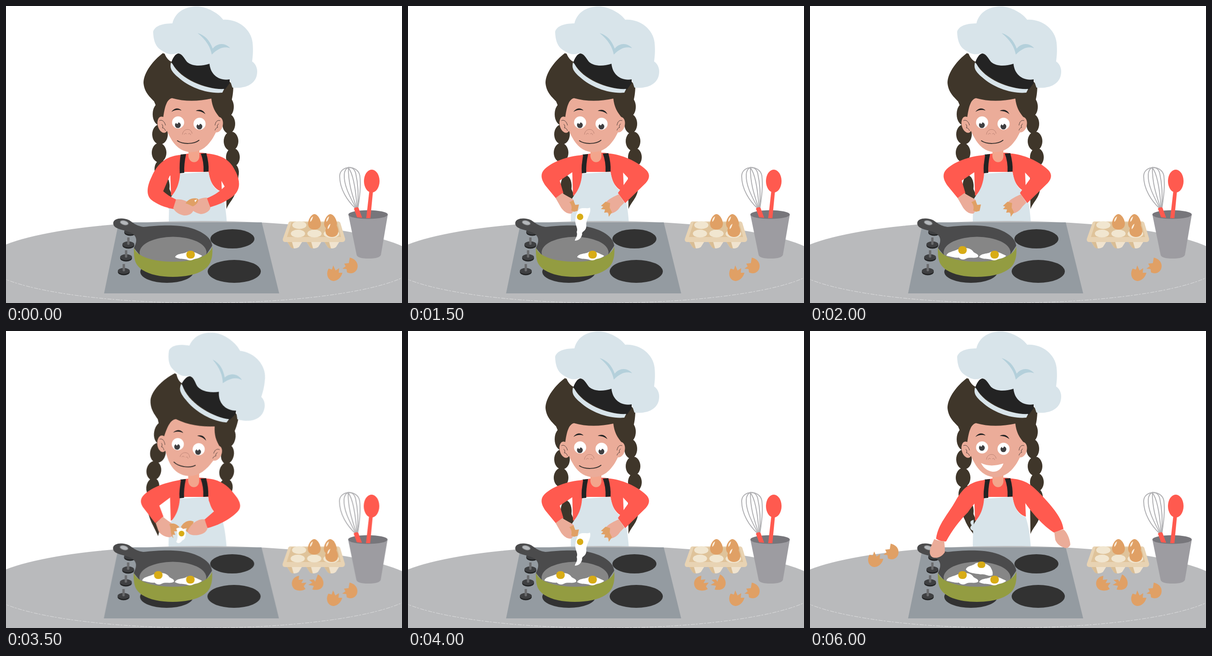
An HTML page that plays this animation: 864x648 px, repeating every 7000 ms.

```html
<!DOCTYPE html>
<html lang="en">
<head>
<meta charset="utf-8">
<title>Cooking eggs</title>
<style>
html, body { margin: 0; width: 100%; height: 100%; overflow: hidden; background: #fff; }
svg { display: block; width: 100%; height: 100%; }

.red { fill: #ff5a4f; }
.skin { fill: #ebac99; }
.hair { fill: #3f362a; }
.cloth { fill: #d8e4ea; }
.black { fill: #232323; }
.shell { fill: #e0a065; }
.white { fill: #fff; }
.yolk { fill: #d8ac16; }
.burner { fill: #323232; }
.line { fill: none; stroke: #4a3a36; stroke-width: 1; stroke-linecap: round; }

/* Every change is a hard cut, so all timelines hold their steps. */
.scene, .tilt, .pupils, .closed, [class^="show"] { animation: 7s step-end infinite; }
[class^="show"] { visibility: hidden; }
.scene { animation-name: nudge; }
.tilt { animation-name: tilt; transform-origin: 411px 256px; }
.pupils { animation-name: look-up; }
.closed { animation-name: close-mouth; }
.show-hold { animation-name: hold; }
.show-crack { animation-name: crack; }
.show-open { animation-name: open; }
.show-drop { animation-name: drop; }
.show-second { animation-name: second; }
.show-shells { animation-name: shells; }
.show-third { animation-name: third; }
.show-rest { animation-name: rest; }
.show-grin { animation-name: grin; }

@keyframes nudge {
  14.285% { transform: translateX(.5px); } 21.428% { transform: none; }
  50% { transform: translateX(-.5px); } 57.142% { transform: none; }
}
@keyframes tilt {
  14.285%, 50% { transform: translate(-1px, -1px) rotate(10deg); }
  21.428%, 57.142% { transform: none; }
}
@keyframes hold { 0%, 35.714% { visibility: visible; } 14.285%, 50% { visibility: hidden; } }
@keyframes crack { 14.285%, 50% { visibility: visible; } 21.428%, 57.142% { visibility: hidden; } }
@keyframes open { 21.428%, 57.142% { visibility: visible; } 35.714%, 71.428% { visibility: hidden; } }
@keyframes drop { 21.428%, 57.142% { visibility: visible; } 28.571%, 64.285% { visibility: hidden; } }
@keyframes second { 28.571% { visibility: visible; } }
@keyframes shells { 35.714% { visibility: visible; } }
@keyframes third { 64.285% { visibility: visible; } }
@keyframes rest { 71.428% { visibility: visible; } }
@keyframes grin { 85.714% { visibility: visible; } }
@keyframes close-mouth { 85.714% { visibility: hidden; } }
@keyframes look-up { 85.714% { transform: translateY(-5px); } }
</style>
</head>
<body>
<svg viewBox="0 0 864 648">
<defs>
  <g id="knob">
    <ellipse cy="1" rx="13" ry="7.5" fill="#242526"/>
    <ellipse cy="-1" rx="13" ry="6.5" fill="#3f4042"/>
    <path d="M-2.5 -16H2.5V-1Q0 1 -2.5 -1Z" fill="#6a6b6d"/>
  </g>
  <g id="egg">
    <path class="shell" d="M0 -17C8 -16 14 -4 14 4C14 12 8 17 0 17S-14 12 -14 4C-14 -4 -8 -16 0 -17Z"/>
    <path d="M-3 -12C-8 -9 -10 -4 -9 0C-6 -2 -4 -7 -3 -12Z" fill="#fbeedd"/>
  </g>
  <g id="shellPair" class="shell">
    <path d="M704 573L711 575L714 566L719 577L727 572L726 582L734 582C731 594 722 600 714 600C700 598 698 582 704 573Z"/>
    <path d="M750 549C764 552 770 563 766 574C761 584 751 585 744 581L743 574L734 573L741 568L738 562L748 561Z"/>
  </g>
  <g id="cartonCup">
    <path d="M-16 -6H16L9 5Q0 11 -9 5Z" fill="#f0e3ce"/>
    <path d="M-16 -6H-6L-2 8Q-7 8 -9 5Z" fill="#d9bd94"/>
  </g>
</defs>

<g class="scene">
  <g class="tilt hair">
    <ellipse cx="335" cy="236" rx="15" ry="24"/>
    <ellipse cx="336" cy="280" rx="17" ry="22"/>
    <ellipse cx="334" cy="320" rx="16" ry="21"/>
    <ellipse cx="338" cy="356" rx="14" ry="20"/>
    <ellipse cx="345" cy="393" rx="12" ry="23"/>
    <path d="M335 403C340 425 354 438 368 459L370 430L356 398Z"/>
    <ellipse cx="483" cy="220" rx="14" ry="22"/>
    <ellipse cx="486" cy="257" rx="14" ry="21"/>
    <ellipse cx="491" cy="295" rx="16" ry="21"/>
    <ellipse cx="495" cy="330" rx="15" ry="20"/>
    <ellipse cx="494" cy="363" rx="14" ry="20"/>
    <path d="M480 360H508C507 380 505 385 502 400C499 420 488 426 481 443Z"/>
    <path d="M342 103C322 118 300 145 300 168C302 190 316 200 323 208L345 260H470L490 215C494 200 496 190 496 172L420 110L376 103L362 122C356 120 350 114 346 104Z"/>
  </g>

  <path class="red" d="M356 333C370 326 385 324 398 322L422 320C440 320 455 326 468 333L471 405C455 400 445 385 442 362H380C380 385 375 408 360 414L358 350Z"/>
  <path d="M398 308H422V328C421 345 400 345 398 328Z" fill="#f3a58c"/>
  <path class="cloth" d="M380 366L442 362C446 388 456 402 470 405C476 420 480 445 482 475H355L356 425C361 410 376 406 380 366Z"/>
  <path class="black" d="M381 324L393 323Q388 345 389 364L379 365Q378 343 381 324ZM425 322L437 321Q443 342 442 361L431 362Q432 340 425 322Z"/>

  <g class="tilt">
    <ellipse class="skin" cx="342" cy="259" rx="11" ry="18" transform="rotate(-14 342 259)"/>
    <ellipse class="skin" cx="462" cy="259" rx="11" ry="17" transform="rotate(14 462 259)"/>
    <path class="skin" d="M343 244C346 222 350 204 362 201C390 209 420 208 448 202C450 220 456 232 468 245C462 275 445 305 425 314C410 321 395 320 382 313C365 303 357 285 350 270Z"/>
    <path class="line" d="M335 250C340 247 346 252 348 260M340 258Q344 262 341 266Q345 265 348 272M467 250C462 248 457 252 456 260M464 257Q459 261 462 265Q458 265 456 271"/>
    <circle class="white" cx="375.5" cy="254" r="13.2"/>
    <circle class="white" cx="422.3" cy="257" r="13.2"/>
    <g class="pupils">
      <circle cx="375" cy="260" r="6.3" fill="#3f3f41"/>
      <circle cx="422" cy="263" r="6.3" fill="#3f3f41"/>
      <path class="white" d="M371 253H376Q376 258 372 257ZM418 256H423Q423 261 419 260Z"/>
    </g>
    <path class="black" d="M361 231C367 222 377 221 383 228C375 226 369 226 361 231ZM414 229C422 224 431 227 435 236C428 230 421 229 414 229Z"/>
    <path class="line" d="M385 280C386 267 404 265 406 278M389 280Q391 276 394 279M398 279Q401 276 403 281" style="stroke: #b98072"/>
    <path class="closed" d="M374 294C385 302 410 302 421 293" fill="none" stroke="#3a3330" stroke-width="2" stroke-linecap="round"/>
    <path class="show-grin" fill="#fff" d="M373 288C390 296 405 294 422 289C418 302 408 308 398 307C386 305 378 298 373 288Z"/>
    <path class="black" d="M361 122C366 108 373 102 378 104C395 115 410 125 443 125L488 158V168L478 182C440 182 382 160 361 122Z"/>
    <path class="cloth" d="M360 123C357 135 360 142 375 155C400 178 440 192 472 189L476 181C440 183 382 162 363 126Z"/>
    <path class="cloth" d="M363 38C370 10 395 0 420 1C445 4 465 18 474 30C505 28 535 50 538 80C540 100 538 112 537 121C547 128 550 140 547 152C542 172 520 181 494 178L488 160C465 164 446 150 444 126C425 132 407 132 395 122C388 113 384 105 378 104C372 101 366 109 350 103C340 96 322 94 321 56C325 42 345 38 363 38Z"/>
    <path fill="#b4d0db" d="M418 59C434 64 444 74 451 93C462 80 478 80 489 92C475 87 462 93 449 106C446 90 437 74 418 59Z"/>
  </g>

  <g fill="#b9babc">
    <ellipse cx="428" cy="558.5" rx="473" ry="89.5"/>
    <path d="M-2 558H866V648H-2Z"/>
  </g>
  <path d="M-45 558.5A473 89.5 0 0 0 901 558.5" fill="none" stroke="#fff" stroke-width=".7" stroke-dasharray="9 2 4 3" opacity=".75"/>

  <path d="M246 472H558L596 627H214Z" fill="#949ba1"/>
  <g class="burner">
    <ellipse cx="494" cy="508" rx="48" ry="21"/>
    <ellipse cx="498" cy="579" rx="58" ry="25"/>
    <ellipse cx="351" cy="580" rx="58" ry="24"/>
  </g>
  <use href="#knob" x="271" y="493"/>
  <use href="#knob" x="267" y="521"/>
  <use href="#knob" x="262" y="549"/>
  <use href="#knob" x="257" y="579"/>

  <path fill="#4b4b4c" d="M234 474C234 462 256 461 268 467C278 473 282 479 300 482C320 480 345 478 365 479C412 480 448 500 450 523L430 553H300L279 528C284 518 286 510 282 503C276 493 262 491 248 487C239 484 234 480 234 474Z"/>
  <ellipse cx="258" cy="473" rx="9" ry="4.5" fill="#b5b8bb" stroke="#818385" stroke-width="1.5" transform="rotate(14 258 473)"/>
  <ellipse cx="364.5" cy="538" rx="73" ry="34.5" fill="#868686"/>
  <path fill="#939c41" d="M279 527C284 546 320 558 365 558S444 546 450 525C451 538 450 548 447 556C440 580 404 591 364 591S290 580 282 557C279 548 279 538 279 527Z"/>
  <path class="white" d="M369 548C372 540 385 541 392 538C402 532 414 538 428 545C424 550 414 551 409 553C404 556 398 555 394 553C386 551 378 553 369 548Z"/>
  <rect class="yolk" x="393.5" y="534" width="18.5" height="17" rx="8"/>
  <g class="show-second">
    <path class="white" d="M298 545C298 537 312 536 322 531C333 527 350 525 357 537C361 540 368 541 367 547C360 552 349 547 341 551C336 554 329 554 325 549C316 550 306 546 298 545Z"/>
    <rect class="yolk" x="323.5" y="524" width="18.5" height="17" rx="8"/>
  </g>
  <g class="show-third">
    <path class="white" d="M340 520C344 511 355 513 361 507C371 502 387 508 393 514C397 521 400 526 398 533C390 537 382 529 373 531C362 529 345 529 340 520Z"/>
    <rect class="yolk" x="365.5" y="503" width="17" height="14" rx="6.5"/>
  </g>

  <use href="#cartonCup" x="630" y="521"/>
  <use href="#cartonCup" x="672" y="521"/>
  <use href="#cartonCup" x="711" y="521"/>
  <path d="M621 470H724Q729 470 730 475L740 508Q740 515 734 515H610Q603 515 604 508L616 474Q617 470 621 470Z" fill="#e8d3b3"/>
  <path d="M623 472H723L731 504H613Z" fill="#dfc39a"/>
  <g fill="#f1e6d0">
    <ellipse cx="640" cy="478" rx="15.5" ry="8.5"/>
    <ellipse cx="637" cy="496.500" rx="15.500" ry="8.5"/>
    <ellipse cx="673" cy="496.500" rx="15.500" ry="8.5"/>
    <ellipse cx="710" cy="497" rx="17" ry="9"/>
  </g>
  <use href="#egg" x="673" y="471"/>
  <use href="#egg" x="708" y="471"/>
  <use href="#egg" x="711" y="487"/>

  <path d="M747 455L765 543Q767 551 791 551T818 543L833 455Z" fill="#9d9ca1"/>
  <ellipse cx="790" cy="455" rx="43" ry="9.500" fill="#77767b"/>
  <g fill="none" stroke="#b0b0b3" stroke-width="2">
    <path d="M763 442C745 425 728 400 728 371C729 347 767 346 772 370C775 395 771 420 768 440"/>
    <path d="M764 442C748 412 737 390 738 368C739 348 758 347 763 365C769 392 769 420 767 440"/>
    <path d="M765 441C753 405 747 385 747 353C757 365 763 400 766 440"/>
  </g>
  <path class="red" d="M759 442Q764 437 769 440L777 462L766 461Z"/>
  <ellipse class="red" cx="798" cy="382" rx="17" ry="25"/>
  <path class="red" d="M793 401H801L795 463H786Z"/>

  <use href="#shellPair"/>
  <g class="show-shells" fill="#e0a065">
    <path d="M640 534L639 543L649 542L645 550L656 549L650 557L654 563C646 568 637 567 631 564C620 556 622 537 640 534Z"/>
    <path d="M681 531C692 537 695 549 692 556C688 565 678 566 669 564L672 556L660 554L669 549L662 543L672 542L675 547Z"/>
  </g>
  <g class="show-rest"><use href="#shellPair" x="-574" y="-85"/></g>

  <g class="show-hold">
    <path class="red" d="M379 325C348 328 330 345 318 372C308 392 305 411 316 422C328 432 347 440 366 443L373 423C360 417 350 411 343 404L357 371L377 355Z"/>
    <path class="red" d="M442 322C480 327 492 342 502 363C512 385 511 403 494 416C478 428 460 435 445 439L437 420C452 414 464 407 477 394L468 378L443 360Z"/>
    <path class="skin" d="M371 422C385 421 395 426 403 432L410 440C410 451 400 458 388 457C378 455 368 449 365 441Z"/>
    <path class="skin" d="M438 418C425 418 410 425 402 436C402 445 412 451 425 454C436 453 445 447 446 440Z"/>
    <path class="shell" d="M392 431C396 421 410 417 419 421C421 427 415 434 408 437C404 437 398 431 392 431Z"/>
    <path class="white" d="M411 424L417 422L413 428Z"/>
  </g>

  <g class="show-crack">
    <path class="red" d="M382 325C350 330 320 340 302 357C293 366 293 374 299 384L326 419L344 405L335 381L359 363L378 355Z"/>
    <path class="red" d="M441 322C475 325 491 345 505 364C514 378 513 387 505 395C490 410 465 424 440 430L433 412L455 393L443 370Z"/>
    <path class="white" d="M373 429C380 432 386 427 392 431C394 445 392 455 385 457C381 463 376 465 372 460C377 450 374 440 372 432Z"/>
    <circle class="yolk" cx="383.500" cy="442" r="6.200"/>
    <path class="skin" d="M327 419L343 405C350 412 358 416 362 420C370 432 370 448 357 450C347 449 338 445 333 436Z"/>
    <path class="shell" d="M357 422C363 418 372 420 379 428L372 431L374 437L367 437L370 445L363 444L366 452C358 446 362 432 357 422Z"/>
    <path class="shell" d="M382 428C388 416 400 411 410 416L406 429L398 440L393 436L395 430L387 432Z"/>
    <path class="skin" d="M434 411C420 409 404 420 397 436C396 444 408 447 420 445C432 443 439 437 440 430Z"/>
  </g>

  <g class="show-open">
    <path class="red" d="M382 325C345 328 315 340 298 356C288 366 290 378 300 392L323 420L339 408L331 381L358 363L378 355Z"/>
    <path class="red" d="M441 322C475 326 505 343 520 358C528 366 528 376 519 386L474 430L458 408L481 376L467 361L443 355Z"/>
    <path class="skin" d="M322 419L337 408C345 415 357 418 362 424C361 435 365 447 356 453C347 454 340 448 334 440Z"/>
    <path class="shell" d="M352 428L361 424L365 434L373 433L370 447L362 449L356 446C358 440 357 433 352 428Z"/>
    <path class="skin" d="M460 411C450 415 440 420 433 427C428 435 428 446 437 453C447 454 458 447 463 438L472 429Z"/>
    <path class="shell" d="M421 436L431 427L441 430L440 440L445 450L438 460L437 450L428 451L430 444L421 443L426 438Z"/>
  </g>
  <g class="show-drop">
    <path class="white" d="M374 443C382 439 391 443 397 440C401 452 388 465 389 478C390 492 378 491 380 498C378 507 372 512 364 512C365 506 371 502 368 493C372 485 364 478 365 467C366 458 368 449 374 443Z"/>
    <circle class="yolk" cx="375.500" cy="460" r="7"/>
  </g>

  <g class="show-rest">
    <path class="cloth" d="M357 412C347 414 350 420 353 424C346 430 352 435 357 436Z"/>
    <path class="red" d="M382 325C352 328 335 340 318 370C300 402 280 420 275 453Q285 460 297 459C310 435 325 415 345 395C352 385 358 375 378 358Z"/>
    <path class="red" d="M441 322C472 325 485 337 505 358C530 385 550 408 553 432L533 440C515 430 490 405 468 373L443 360Z"/>
    <path class="skin" d="M271 454Q282 459 293 458C293 465 295 475 294 483C288 492 278 497 268 494C260 490 260 480 264 470Z"/>
    <path class="skin" d="M533 439L553 433C560 438 567 452 568 466C565 474 558 475 553 472C545 470 537 462 535 455Z"/>
  </g>
</g>
</svg>
</body>
</html>
```
